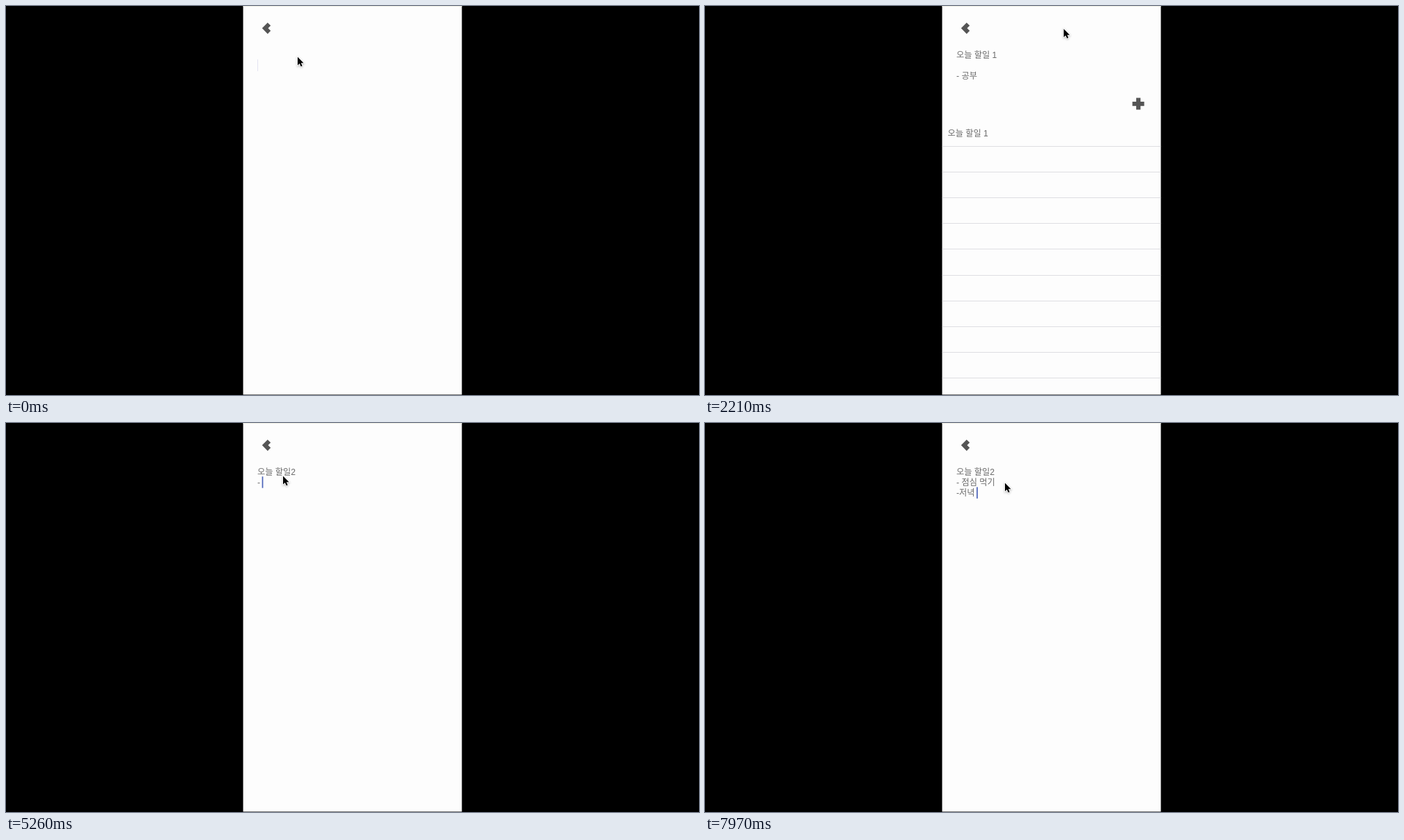
Write an HTML page with a canvas that moves like this. It is 998x561 px and loops after 8 s.

```html
<!DOCTYPE html>
<html lang="ko">
<head>
<meta charset="utf-8">
<title>Memo</title>
<style>
  html, body { margin: 0; width: 100%; height: 100%; overflow: hidden; background: #000; }
  canvas { display: block; }
</style>
</head>
<body>
<canvas id="stage" width="998" height="561"></canvas>
<script>
const ctx = document.getElementById('stage').getContext('2d');
const LOOP = 8000, STEP = 1000 / 24, SLIDE = 400;
const LEFT = 341.5, WIDTH = 315, HEIGHT = 561;
const LINE = 15.2, ROW = 37.17;
const FONT = '12.2px "Liberation Sans", "Noto Sans CJK KR", "Noto Sans CJK", sans-serif';
const INK = '#6a6a6a', ICON = '#555';
const LEADS = 'ㄱㄲㄴㄷㄸㄹㅁㅂㅃㅅㅆㅇㅈㅉㅊㅋㅌㅍㅎ';
const FIRST = '오늘 할일 1', SECOND = '오늘 할일2';

// Every state of a text while its Hangul syllables are being composed.
function keystrokes(prefix, added) {
  const states = [prefix];
  let done = prefix;
  for (const char of added) {
    const code = char.charCodeAt(0) - 0xac00;
    if (code >= 0 && code < 11172) {
      const tail = code % 28;
      states.push(done + LEADS[Math.floor(code / 588)]);
      if (tail) states.push(done + String.fromCharCode(0xac00 + code - tail));
    }
    done += char;
    states.push(done);
  }
  return states;
}

const typing = (start, end, prefix, added) => ({ start, end, states: keystrokes(prefix, added) });

const firstNote = [typing(120, 1720, '', FIRST + '\n\n- 공부')];
const secondNote = [
  typing(3250, 5180, '', SECOND + '\n- '),
  typing(5300, 6040, SECOND + '\n- ', '점심 먹기'),
  typing(7540, 7940, SECOND + '\n- 점심 먹기', '\n-저녁 ')
];

const views = [
  { start: -SLIDE, note: firstNote, focus: 0 },
  { start: 2040, items: [FIRST] },
  { start: 2440, note: secondNote, focus: 2940 },
  { start: 6217, items: [SECOND, FIRST] },
  { start: 7100, note: secondNote, focus: 7490 }
];

// Pointer stops: time, x, y
const pointer = [
  [0, 420, 73], [1780, 420, 73], [1960, 375, 33], [2050, 375, 33],
  [2340, 624, 32], [2460, 624, 32], [2800, 399, 76], [5980, 399, 76],
  [6120, 375, 32], [6240, 375, 32], [6458, 386, 40], [6900, 411, 77],
  [7120, 411, 77], [7400, 432, 86], [LOOP, 432, 86]
];
const clicks = [[1960, 2040], [2360, 2440], [2870, 2940], [6120, 6217], [6980, 7100], [7420, 7490]];

function noteText(note, t) {
  const part = note.filter(p => t >= p.start).pop();
  if (!part) return '';
  const p = Math.min(1, (t - part.start) / (part.end - part.start));
  return part.states[Math.floor(p * (part.states.length - 1))];
}

function polygon(points) {
  ctx.beginPath();
  points.forEach(([x, y]) => ctx.lineTo(x, y));
  ctx.closePath();
  ctx.fill();
}

function label(text, x, y) {
  ctx.fillStyle = INK;
  ctx.fillText(text, x, y);
}

function drawNote(view, t, active) {
  ctx.fillStyle = ICON;
  polygon([[368.8, 32], [376.8, 24], [381.2, 28.2], [377.4, 32], [381.2, 35.8], [376.8, 40.2]]);
  const lines = noteText(view.note, t).split('\n');
  lines.forEach((line, i) => label(line, 362, 74.6 + i * LINE));
  if (!active || t < view.focus) return;
  if (t < 120) {
    ctx.fillStyle = '#e4e4f2';
    ctx.fillRect(362, 77, 1, 17);
    return;
  }
  const last = lines.length - 1;
  ctx.fillStyle = '#4a62b8';
  ctx.fillRect(361.2 + ctx.measureText(lines[last]).width, 62 + last * LINE, 1.7, 16.5);
}

function drawList(view) {
  ctx.fillStyle = ICON;
  ctx.fillRect(615.5, 29, 17, 6.2);
  ctx.fillRect(621, 23.5, 6.2, 17);
  view.items.forEach((item, i) => label(item, 349.5, 79 + i * ROW));
  ctx.fillStyle = '#dedee2';
  for (let i = 0; i < 14; i++) ctx.fillRect(LEFT, Math.round(92.8 + i * ROW), WIDTH, 1);
}

function drawView(view, t, top, bottom, offset, active) {
  ctx.save();
  ctx.beginPath();
  ctx.rect(LEFT, top, WIDTH, bottom - top);
  ctx.clip();
  ctx.translate(0, offset);
  view.items ? drawList(view) : drawNote(view, t, active);
  ctx.restore();
}

function drawPointer(t) {
  const i = Math.max(1, pointer.findIndex(stop => stop[0] > t));
  const [t0, x0, y0] = pointer[i - 1], [t1, x1, y1] = pointer[i];
  const p = (t - t0) / (t1 - t0), e = p * p * (3 - 2 * p);
  const x = x0 + (x1 - x0) * e, y = y0 + (y1 - y0) * e;

  if (clicks.some(([from, to]) => t >= from && t < to)) {
    ctx.strokeStyle = '#2a2a2a';
    ctx.lineWidth = 1.5;
    ctx.beginPath();
    ctx.arc(x, y + 0.5, 18, 0, Math.PI * 2);
    ctx.stroke();
  }
  ctx.save();
  ctx.translate(x, y);
  const arrow = new Path2D('M0 .5V12.6L2.8 10 4.7 14.3 6.7 13.4 4.9 9.3H8.6Z');
  ctx.shadowColor = 'rgba(0,0,0,.3)';
  ctx.shadowBlur = 3;
  ctx.shadowOffsetY = 1;
  ctx.strokeStyle = '#fff';
  ctx.lineWidth = 1.6;
  ctx.stroke(arrow);
  ctx.shadowColor = 'transparent';
  ctx.fillStyle = '#000';
  ctx.fill(arrow);
  ctx.restore();
}

function draw(t) {
  ctx.fillStyle = '#000';
  ctx.fillRect(0, 0, 998, HEIGHT);
  ctx.fillStyle = '#fdfdfd';
  ctx.fillRect(LEFT, 0, WIDTH, 560);
  ctx.fillStyle = '#eeeee4';
  ctx.fillRect(LEFT, 0, WIDTH, 1);
  ctx.fillStyle = '#777';
  ctx.fillRect(LEFT, 560, WIDTH, 1);
  ctx.font = FONT;

  // The leaving view collapses upwards and the next one follows below it.
  const index = views.filter(v => t >= v.start).length - 1;
  const p = Math.min(1, (t - views[index].start) / SLIDE);
  const edge = HEIGHT * (1 - p) ** 3;
  if (p < 1) drawView(views[index - 1], t, 0, edge, 0, false);
  drawView(views[index], t, edge, 560, edge, true);
  drawPointer(t);
}

const begin = performance.now();
function tick() {
  const t = (performance.now() - begin) % LOOP;
  draw(Math.floor(t / STEP + 0.01) * STEP);
  requestAnimationFrame(tick);
}
tick();
</script>
</body>
</html>
```
